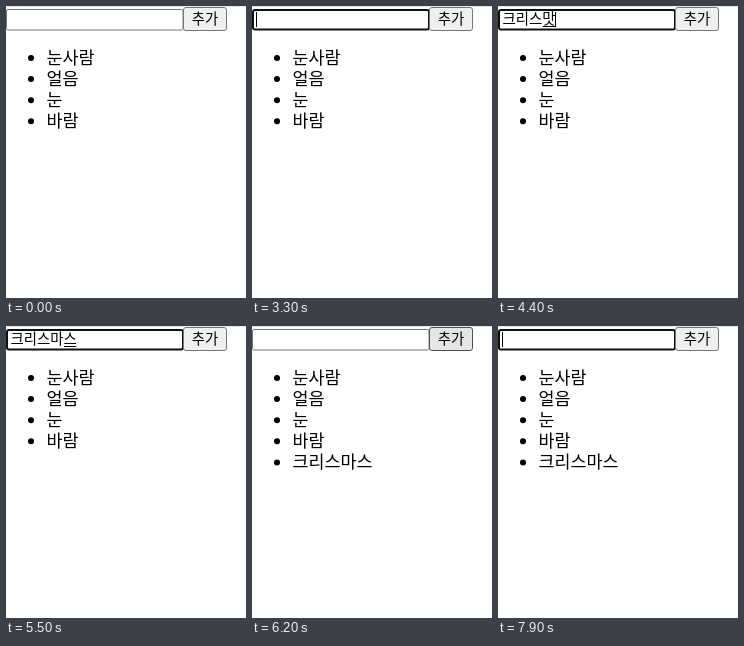
An HTML page that plays this animation: 240x292 px, repeating every 8000 ms.

```html
<!DOCTYPE html>
<html lang="ko">
<meta charset="utf-8">
<style>
  html, body { margin: 0; width: 100%; height: 100%; overflow: hidden; background: #fff; }
  svg { display: block; width: 240px; height: 292px; }
  text { font: 14.4px "Noto Sans CJK KR", "Noto Sans CJK", sans-serif; }
  #list text { font-size: 17.4px; }
</style>
<svg viewBox="0 0 240 292">
  <path d="M0 .5H240" stroke="#e6e6e6"/>
  <rect id="field" fill="#fff"/>
  <text id="typed" x="4.5" y="18"></text>
  <path id="underline" stroke="#000"/>
  <path id="caret" stroke="#000"/>
  <rect id="button" x="177.5" y="1.5" width="43" height="23" rx="2.5"/>
  <text x="199" y="18" text-anchor="middle">추가</text>
  <g id="list"></g>
</svg>
<script>
const LOOP = 8000, CHAR = 13.25;
const $ = id => document.getElementById(id);
const set = (el, attrs) => { for (const k in attrs) el.setAttribute(k, attrs[k]); };

$("list").innerHTML = ["눈사람", "얼음", "눈", "바람", "크리스마스"].map((word, i) => {
  const y = 52 + i * 21.1;
  return `<g><circle cx="25" cy="${y}" r="3"/><text x="40.5" y="${Math.round(y + 5.6)}">${word}</text></g>`;
}).join("");
const added = $("list").lastChild;

// Each keystroke of the Korean input method
const strokes = ["", "ㅋ", "크", "클", "크리", "크릿", "크리스", "크리슴", "크리스마", "크리스맛", "크리스마스"];

function strokeCount(t) {
  if (t < 3500 || t >= 6200) return 0;
  if (t < 4000) return Math.min(4, Math.floor((t - 3500) / 100) + 1);
  return Math.min(10, Math.floor((t - 4000) / 100) + 5);
}

const within = (t, a, b) => t >= a && t < b;

function draw(t) {
  const focused = within(t, 2300, 6100) || t >= 6800;
  const blinkOff = within(t, 2800, 3300) || within(t, 5000, 5600) || within(t, 7300, 7900);
  const pressed = within(t, 6100, 6200);
  const hover = within(t, 5800, 6500);
  const word = strokes[strokeCount(t)];
  const end = 4.5 + word.length * CHAR;

  set($("field"), focused
    ? { x: 1, y: 4, width: 176, height: 19.5, rx: 2, stroke: "#101010", "stroke-width": 2 }
    : { x: .5, y: 3.5, width: 176.5, height: 20.5, rx: 1.5, stroke: "#767676", "stroke-width": 1 });
  $("typed").textContent = word;
  set($("underline"), { d: focused && word ? `M${end - CHAR + .5} 20.5H${end - .5}` : "" });
  const x = Math.floor(end) + .5;
  set($("caret"), { d: focused && !blinkOff ? `M${x} 6V21` : "" });
  set($("button"), {
    fill: pressed ? "#f5f5f5" : hover ? "#e5e5e5" : "#efefef",
    stroke: pressed ? "#8d8d8d" : hover ? "#4f4f4f" : "#767676"
  });
  set(added, { visibility: t >= 6200 ? "visible" : "hidden" });
}

const start = performance.now();
function tick() {
  draw((performance.now() - start) % LOOP);
  requestAnimationFrame(tick);
}
tick();
</script>
</html>
```
